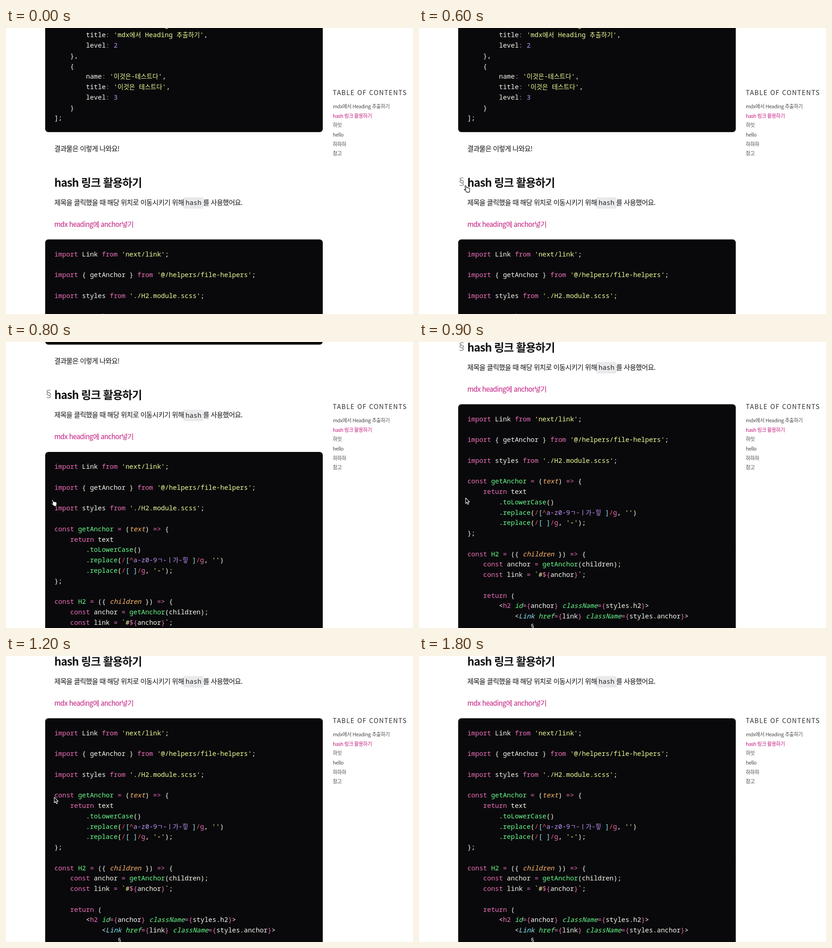
These frames come from a looping animation (893 px wide and 627 px high, 1.9 s). An HTML page:

```html
<!DOCTYPE html>
<html lang="ko">
<head>
<meta charset="utf-8">
<title>Hash links</title>
<style>
  html, body { margin: 0; width: 100%; height: 100%; overflow: hidden; background: #fff; }
  svg { display: block; width: 893px; height: 627px; }
  text { white-space: pre; font-family: "Noto Sans CJK KR", "Noto Sans CJK", "Noto Sans", sans-serif; }
  .body { font-size: 15px; letter-spacing: -.65px; fill: #111114; }
  .h2 { font-size: 24.1px; font-weight: 700; letter-spacing: -.98px; fill: #111114; }
  .link { fill: #c3177d; letter-spacing: -.6px; }
  .mark { font: 300 24px "Open Sans", "Noto Sans", sans-serif; fill: #555; text-anchor: middle; }
  .toc-title { font-size: 14px; font-weight: 500; letter-spacing: 1.4px; fill: #2c2c30; }
  .toc { font-size: 11px; letter-spacing: -.42px; fill: #4c4c50; }
  .toc.on { fill: #c3177d; font-weight: 500; letter-spacing: -.5px; }
  .code { font: 500 14.44px "Noto Sans Mono", "DejaVu Sans Mono", monospace; fill: #f8f8f2; }
  .inline { fill: #222226; }
  .ko { font: 13.86px "Noto Sans CJK KR", "Noto Sans CJK", sans-serif; }
  .p { fill: #ee70ba; } .g, .G { fill: #69fb8c; } .y { fill: #f2fc98; } .v { fill: #bd93f9; }
  .o { fill: #ffb86c; } .c, .C { fill: #8be9fd; } .r { fill: #ff5555; }
  .o, .G, .C { font-style: italic; }
</style>
</head>
<body>
<svg viewBox="0 0 893 627">
  <g id="page">
    <rect x="86" y="-40" width="609" height="268.3" rx="7" fill="#09090b"/>
    <rect x="86" y="463.5" width="609" height="620" rx="7" fill="#09090b"/>
    <rect x="389" y="371" width="44.4" height="25" rx="3.5" fill="#e9eaec"/>
    <text class="body" x="106" y="269.5">결과물은 이렇게 나와요!</text>
    <text class="mark" id="mark" x="93.8" y="346">§</text>
    <text class="h2" x="106" y="347.5">hash 링크 활용하기</text>
    <text class="body" x="106" y="387.8">제목을 클릭했을 때 해당 위치로 이동시키기 위해</text>
    <text class="code inline" x="394" y="388.3">hash</text>
    <text class="body" x="432.6" y="387.8">를 사용했어요.</text>
    <text class="body link" x="106" y="435.6">mdx heading에 anchor넣기</text>
  </g>
  <g id="toc"><text class="toc-title" x="717" y="147">TABLE OF CONTENTS</text></g>
  <path id="hand" fill="#fff" stroke="#000" stroke-width="1.1" stroke-linejoin="round"
    d="M3 6L1.6 2.4C1 .6 3-.2 3.8 1.4L5.4 5C6 4.2 7.2 4.4 7.4 5.2C8 4.4 9.4 4.6 9.6 5.6C10.4 5 11.6 5.6 11.8 6.6C12.2 8.6 12.6 10.6 11.6 12.4L11.8 14.4L6 15.2L5.4 13.8C3.8 12.6 2.4 10.8 .8 9.8C-.4 8.8 .8 7.4 2.2 8.2L3.6 9Z"/>
  <path id="arrow" fill="#000" stroke="#fff" stroke-width="1.1" stroke-linejoin="round"
    d="M.5.8V13L3.3 10.4L5.3 15L7.3 14.1L5.3 9.6H9.1Z"/>
</svg>
<script>
const NS = 'http://www.w3.org/2000/svg';
const $ = id => document.getElementById(id);
const LINE = 22.76;

function add(parent, tag, cls, text = '') {
  const el = parent.appendChild(document.createElementNS(NS, tag));
  el.setAttribute('class', cls);
  el.textContent = text;
  return el;
}

function place(el, x, y) {
  el.setAttribute('x', x);
  el.setAttribute('y', y);
}

// Each piece between tildes starts with its colour class.
function codeLines(lines, top) {
  lines.forEach((line, i) => {
    if (!line) return;
    const row = add($('page'), 'text', 'code');
    place(row, 106.2, top + i * LINE);
    for (const piece of line.split('~')) {
      for (const part of piece.slice(1).split(/([ㄱ-힣]+)/)) {
        if (part) add(row, 'tspan', piece[0] + (/[ㄱ-힣]/.test(part) ? ' ko' : ''), part);
      }
    }
  });
}

const field = (name, cls, value, end = ',') => `w        ${name}~p:~w ~${cls}${value}~w${end}`;

codeLines([
  field('name', 'y', "'mdx에서-heading-추출하기'"),
  field('title', 'y', "'mdx에서 Heading 추출하기'"),
  field('level', 'v', '2', ''),
  'w    },',
  'w    {',
  field('name', 'y', "'이것은-테스트다'"),
  field('title', 'y', "'이것은 테스트다'"),
  field('level', 'v', '3', ''),
  'w    }',
  'w];'
], -2.4);

codeLines([
  "pimport~w Link ~pfrom~y 'next/link'~w;",
  '',
  "pimport~w { getAnchor } ~pfrom~y '@/helpers/file-helpers'~w;",
  '',
  "pimport~w styles ~pfrom~y './H2.module.scss'~w;",
  '',
  'pconst~g getAnchor~p =~w (~otext~w) ~p=>~w {',
  'p    return~w text',
  'w        .~gtoLowerCase~w()',
  "w        .~greplace~w(~r/~c[~r^~va-z0-9ㄱ-ㅣ가-힣~c ]~r/~pg~w, ~y''~w)",
  "w        .~greplace~w(~r/~c[ ]~r/~pg~w, ~y'-'~w);",
  'w};',
  '',
  'pconst~g H2~p =~w ({ ~ochildren~w }) ~p=>~w {',
  'p    const~w anchor ~p=~g getAnchor~w(children);',
  'p    const~w link ~p=~y `#~p${~wanchor~p}~y`~w;',
  '',
  'p    return~w (',
  'w        <~ph2~G id~p={~wanchor~p}~G className~p={~wstyles.h2~p}~w>',
  'w            <~CLink~G href~p={~wlink~p}~G className~p={~wstyles.anchor~p}~w>',
  'w                §'
], 500.8);

['mdx에서 Heading 추출하기', 'hash 링크 활용하기', '하잇', 'hello', '하하하', '참고'].forEach((label, i) =>
  place(add($('toc'), 'text', i === 1 ? 'toc on' : 'toc', label), 717, 176.2 + i * 20.6));

const scroll = [[0, 0], [7, -15.2], [8, -222.6], [9, -327]];
const cursor = [
  [0, null],
  [4, ['hand', 111, 337]], [5, ['hand', 102, 343]], [6, ['hand', 99.2, 345.2]],
  [9, ['arrow', 101.8, 341]], [10, ['arrow', 102.8, 333]],
  [11, ['arrow', 104.2, 321]], [12, ['arrow', 105.5, 308.8]],
  [13, null]
];
const mark = [[0, false], [4, true], [10, false]];
const at = (track, step) => track.filter(k => k[0] <= step).pop()[1];
const show = (el, on) => el.setAttribute('visibility', on ? 'visible' : 'hidden');

function draw() {
  const step = Math.floor(performance.now() % 1900 / 100);
  const pose = at(cursor, step);
  $('page').setAttribute('transform', `translate(0 ${at(scroll, step)})`);
  show($('mark'), at(mark, step));
  for (const id of ['hand', 'arrow']) show($(id), pose && pose[0] === id);
  if (pose) $(pose[0]).setAttribute('transform', `translate(${pose[1]} ${pose[2]})`);
  requestAnimationFrame(draw);
}
draw();
</script>
</body>
</html>
```
